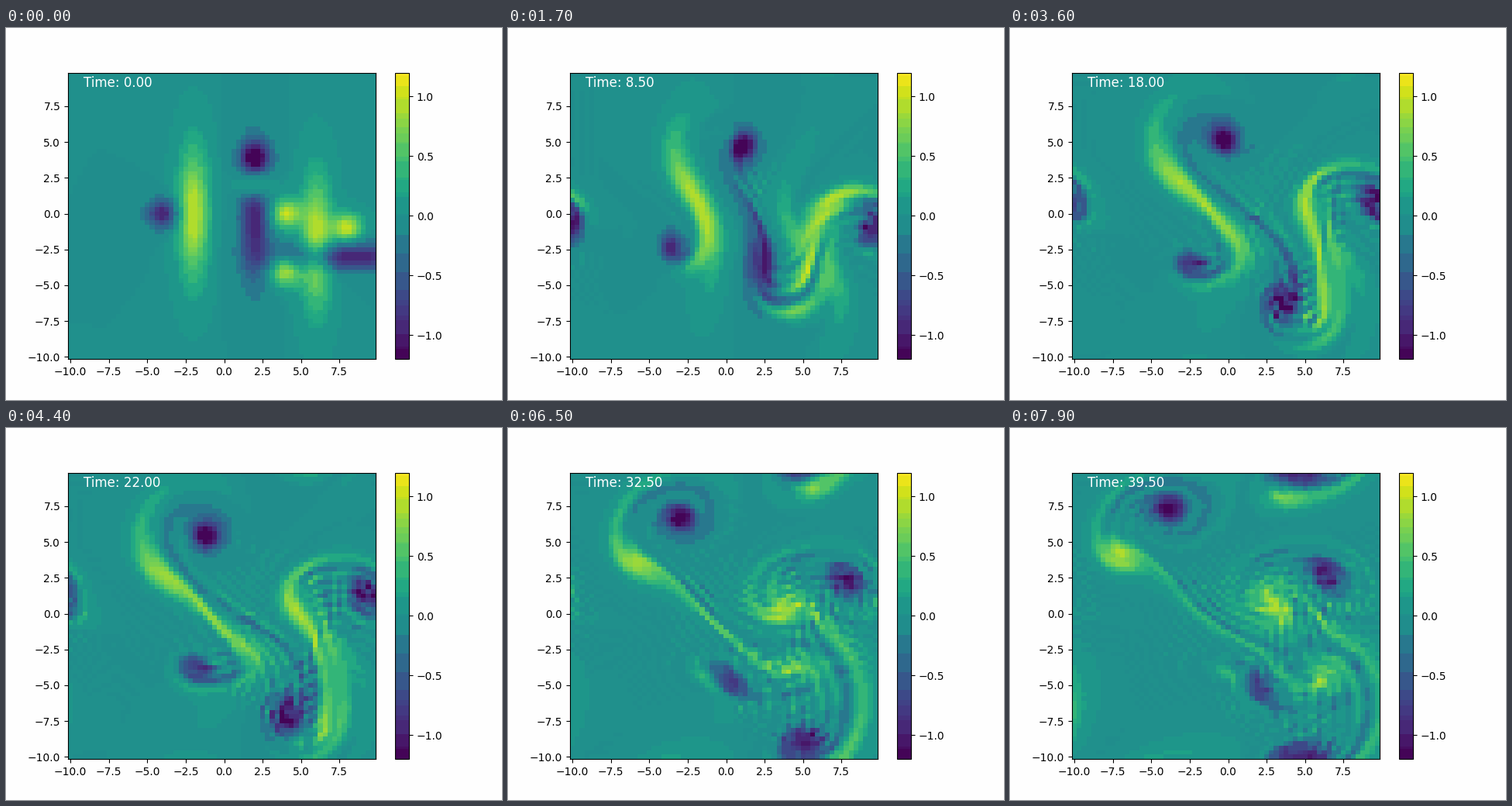
Animation, 640 px wide and 480 px high, one loop 8000 ms. Source, as a matplotlib script:

```python
import numpy as np
import matplotlib.pyplot as plt
from matplotlib.animation import FuncAnimation
from matplotlib.colors import ListedColormap

# Vorticity transport on a periodic square
N, L, NU = 64, 20.0, 0.001
FRAMES, STEP, SUB = 80, 0.5, 10
LIMIT = 1.2

dx = L / N
x = -L / 2 + dx * np.arange(N)
X, Y = np.meshgrid(x, x)

k = 2 * np.pi * np.fft.fftfreq(N, dx)
KX, KY = np.meshgrid(k, k)
K2 = KX**2 + KY**2
K2[0, 0] = 1.0

# sign, centre x, centre y, squared width x, squared width y
VORTICES = [
    (-1, -4, 0, 1, 1),
    (1, -2, 0, 1, 20),
    (-1, 2, 4, 1, 1),
    (1, 2, 2, 1, 1),
    (-1, 2, 0, 1, 20),
    (1, 4, 0, 1, 1),
    (1, 4, -4, 1, 1),
    (1, 6, -2, 1, 20),
    (1, 8, -1, 1, 1),
    (-1, 8, -3, 20, 1),
]


def diff(f, axis):
    return (np.roll(f, -1, axis) - np.roll(f, 1, axis)) / (2 * dx)


def laplacian(f):
    around = sum(np.roll(f, s, a) for s in (1, -1) for a in (0, 1))
    return (around - 4 * f) / dx**2


def rhs(w):
    psi_hat = -np.fft.fft2(w) / K2
    psi_hat[0, 0] = 0
    psi = np.fft.ifft2(psi_hat).real
    jacobian = diff(psi, 1) * diff(w, 0) - diff(psi, 0) * diff(w, 1)
    return NU * laplacian(w) - jacobian


def rk4(w, h):
    a = rhs(w)
    b = rhs(w + h / 2 * a)
    c = rhs(w + h / 2 * b)
    d = rhs(w + h * c)
    return w + h / 6 * (a + 2 * b + 2 * c + d)


def simulate():
    w = sum(s * np.exp(-(X - cx)**2 / sx - (Y - cy)**2 / sy)
            for s, cx, cy, sx, sy in VORTICES)
    states = [w]
    for _ in range(FRAMES - 1):
        for _ in range(SUB):
            w = rk4(w, STEP / SUB)
        states.append(w)
    return states


def banded_viridis(w):
    """Viridis merged into coarse RGB buckets, each with its mean colour."""
    rgb = plt.get_cmap("viridis")(np.arange(256), bytes=True)[:, :3].astype(int)
    key = (rgb[:, 0] >> 5) * 256 + (rgb[:, 1] >> 4) * 8 + (rgb[:, 2] >> 5)
    _, group = np.unique(key, return_inverse=True)
    level = np.clip((w + LIMIT) / (2 * LIMIT) * 256, 0, 255).astype(int)
    # weight by area: colour bar rows plus mesh cells
    weight = 26 + 36 * np.bincount(level.ravel(), minlength=256)
    total = np.bincount(group, weight)
    mean = [np.bincount(group, weight * rgb[:, c]) / total for c in range(3)]
    return ListedColormap(np.floor(np.array(mean).T)[group] / 255)


states = simulate()

fig, ax = plt.subplots(figsize=(6.4, 4.8), dpi=100, facecolor="#fefefe")
mesh = ax.pcolormesh(x, x, states[0], cmap=banded_viridis(states[0]),
                     vmin=-LIMIT, vmax=LIMIT, shading="nearest")
fig.colorbar(mesh, ax=ax)
label = ax.text(0.05, 0.95, "", transform=ax.transAxes,
                color="white", fontsize=12)


def update(i):
    mesh.set_array(states[i])
    label.set_text(f"Time: {i * STEP:.2f}")
    return mesh, label


anim = FuncAnimation(fig, update, frames=FRAMES, interval=100,
                     repeat=True, repeat_delay=0)
plt.show()
```
